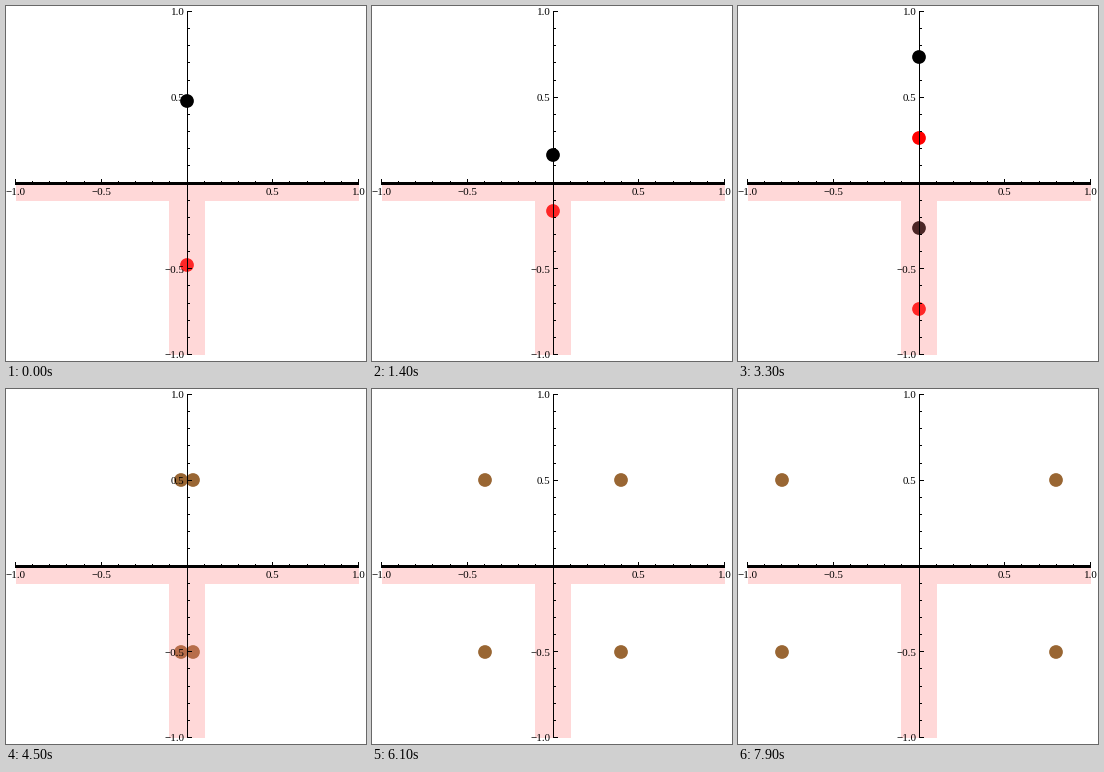
These frames come from a looping animation (360x355 px, 8000 ms). A matplotlib script:

```python
from math import floor

import matplotlib.pyplot as plt
from matplotlib.animation import FuncAnimation
from matplotlib.patches import Circle, Polygon

W, H, DPI = 360, 355, 64
PT = 72 / DPI                  # points per pixel
CX, CY, UNIT = 181, 177, 171.5
FRAMES, STEP = 80, 0.0225
BROWN = (0.6, 0.4, 0.2)


def px(x, y):
    return CX + UNIT * x, CY - UNIT * y


fig = plt.figure(figsize=(W / DPI, H / DPI), dpi=DPI, facecolor="white")
ax = fig.add_axes([0, 0, 1, 1])
ax.set(xlim=(0, W), ylim=(H, 0))
ax.axis("off")


def line(x0, y0, x1, y1, width=1):
    ax.plot([x0, x1], [y0, y1], color="black", lw=width * PT, zorder=4,
            solid_capstyle="butt", snap=False)


def label(x, y, value, align):
    text = f"{value:.1f}".replace("-", "\u2212")
    ax.text(x, y, text, family="Liberation Serif", size=11 * PT,
            ha=align, va="baseline", zorder=5)


def draw_axes():
    line(CX + 0.5, 5, CX + 0.5, 349)
    line(9, CY + 0.5, 353, CY + 0.5, 3)
    for k in range(-10, 11):
        if k == 0:
            continue
        x, y = px(k / 10, k / 10)
        col, row = floor(x) + 0.5, floor(y) + 0.5    # pixel centres
        major = k % 5 == 0
        size = 5 if major else 3
        line(CX, row, CX + size, row)
        line(col, CY + 1, col, CY + 1 - size)
        if major:
            label(CX - 2.5, y + 3.8, k / 10, "right")
            label(x, CY + 12, k / 10, "center")


# Translucent T-shaped region lying over the balls
T = 0.105
region = [(-1, 0), (1, 0), (1, -T), (T, -T),
          (T, -1), (-T, -1), (-T, -T), (-1, -T)]
ax.add_patch(Polygon([px(*p) for p in region], facecolor=(1, 0.5, 0.5),
                     alpha=0.3, lw=0, zorder=3))
draw_axes()
balls = [ax.add_patch(Circle((0, 0), 0.04 * UNIT, lw=0, zorder=2))
         for _ in range(4)]


def update(i):
    s = STEP * (i + 1)
    if s < 1:
        # Black balls fall while their red mirror images rise
        state = [(0, 0.5 - s, "black"), (0, 1.5 - s, "black"),
                 (0, s - 0.5, "red"), (0, s - 1.5, "red")]
    else:
        d = s - 1
        state = [(x, y, BROWN) for x in (-d, d) for y in (0.5, -0.5)]
    for ball, (x, y, color) in zip(balls, state):
        # Balls sit on whole pixels
        ball.center = CX + round(UNIT * x), CY - round(UNIT * y)
        ball.set_facecolor(color)
    return balls


anim = FuncAnimation(fig, update, frames=FRAMES, interval=100,
                     repeat=True, repeat_delay=0)
plt.show()
```
